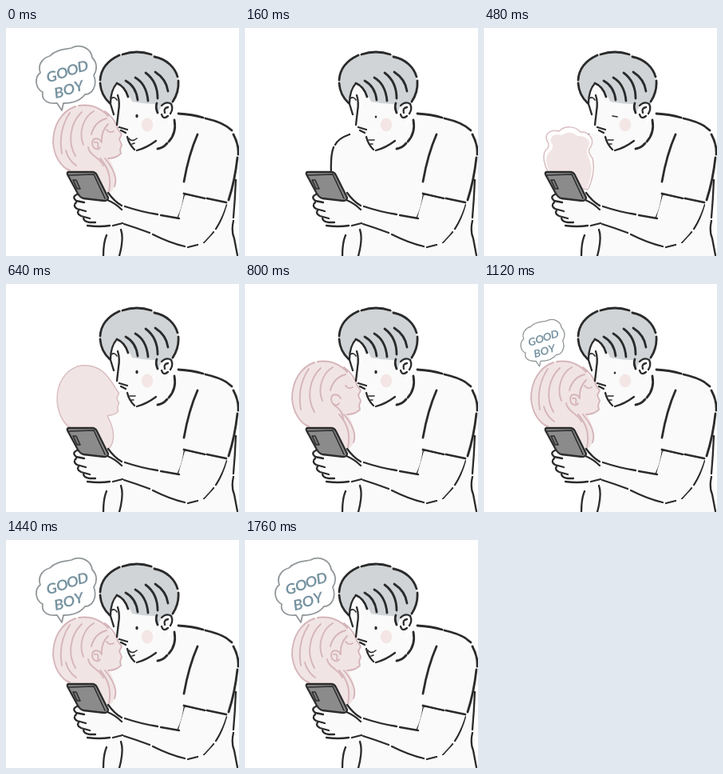
An HTML page for the animation above (1.92 s loop, 292 px wide and 285 px high).

```html
<!DOCTYPE html>
<html lang="en">
<head>
<meta charset="utf-8">
<title>Good boy</title>
<style>
  html, body { margin: 0; width: 100%; height: 100%; overflow: hidden; background: #fff; }
  svg { display: block; width: 100vw; height: 100vh; }
  path { stroke-linecap: round; stroke-linejoin: round; }
  .ink { fill: none; stroke: #2b2b2b; stroke-width: 2.3; }
  .bold { stroke-width: 2.8; }
  .fine { stroke-width: 1.6; }
  .pink { fill: none; stroke: #d5b5ba; stroke-width: 1.9; }
  .skin { fill: #fafafa; }
  .rose { fill: #f1e4e5; }
  .bubble { fill: #fff; stroke: #92979a; stroke-width: 1.8; }
  text { font: 700 18px Lato, "Open Sans", sans-serif; fill: #7893a1; text-anchor: middle; }
</style>
</head>
<body>
<svg viewBox="0 0 292 285">
  <defs>
    <path id="head" d="M80 180C70 176 60 162 59 143C58 122 69 104 87 98C103 94 119 99 129 111C134 117 138 122 140 126L145 133L142 140L145 146L143 152L144 157C141 161 135 162 129 163C134 172 139 184 137 194C136 200 133 205 128 208L105 200Z"/>
  </defs>

  <!-- body -->
  <path class="skin" d="M134 131C120 138 109 147 108 166L106 184L126 248L121 285H290L284 240L291 158C290 140 286 126 270 118C251 110 231 107 211 107L190 143Z"/>
  <path class="ink" d="M131 133Q117 138 113 146M111 149Q107 159 108 181M126 259Q122 268 122 285M144 252Q148 263 142 285"/>
  <path class="ink bold" d="M216 107Q234 108 247 112M250 113Q273 118 283 128M285 133Q292 146 291 158M290 162Q287 190 279 215"/>
  <path class="ink" d="M288 190Q287 215 285 237M285 241Q282 254 286 263L290 284"/>
  <path class="ink bold" d="M240 133Q229 158 223 192M223 207L249 213M252 213L276 218M224 209Q222 225 216 237"/>
  <path class="ink" d="M276 221Q271 239 263 251M260 255L248 268"/>
  <path class="skin" d="M131 92L134 110L141 126L150 134L155 147Q163 156 175 149Q196 140 202 121L208 104L201 85L165 65L139 65Z"/>
  <path class="ink bold" d="M211 115Q214 131 204 142M202 144Q197 150 190 151"/>

  <!-- growing shape -->
  <g data-on="2" transform="translate(110 200) scale(.62) translate(-110 -200)">
    <use href="#cloud"/>
  </g>
  <g data-on="3">
    <g id="cloud">
      <path d="M81 181C75 171 73 160 77 153Q84 148 79 141C75 132 84 126 94 129C101 122 114 122 121 130C131 129 139 139 134 148C129 154 132 157 136 163C139 176 136 191 130 202L107 197Z" fill="#fff" stroke="#d9bdc1" stroke-width="1.5"/>
      <path class="rose" d="M84 181C76 170 77 158 83 154Q89 149 84 143C82 135 89 131 97 134Q108 127 117 135C128 134 136 141 130 150C126 156 134 163 135 177Q134 190 128 201L107 196Z"/>
    </g>
  </g>
  <g data-on="4" transform="translate(110 200) scale(.9 .95) translate(-110 -200)">
    <use href="#head" class="rose" style="stroke:#d9bdc1;stroke-width:1.6"/>
  </g>

  <!-- woman -->
  <g data-on="0 5 6 7 8 9 10 11">
    <use href="#head" class="rose"/>
    <path class="pink" d="M80 178C69 174 60 160 59 143C59 121 70 104 87 98M91 97C106 95 118 99 128 110M124 104Q135 112 140 125M140 126L145 133L142 139L145 146L143 152L144 157Q138 163 128 163"/>
    <path class="pink" d="M80 106Q65 128 70 157M95 105C80 119 77 143 87 160M110 104C96 112 91 132 97 146M126 113Q111 117 107 133M124 163C134 175 140 188 136 198M118 163Q134 181 129 204"/>
    <path class="pink" d="M118 149C115 154 108 150 108 144C108 137 116 136 120 143"/>
    <path class="pink" d="M126 127Q130 132 135 129"/>
    <g data-on="0 6 7 8 9 10 11">
      <path class="pink" d="M111 143Q117 141 115 149M120 142Q119 129 128 120M103 149C104 159 118 162 122 172M75 153Q78 165 88 172"/>
    </g>
    <path data-on="5" class="pink" d="M111 151Q123 158 123 169"/>
  </g>

  <!-- face -->
  <path class="ink" d="M131 95L135 108M140 84Q143 93 141 104L139 121M142 124L152 127M144 128L150 131M152 136Q154 145 161 152M164 153Q176 150 188 141"/>
  <path class="ink fine" d="M132 88Q136 85 139 90"/>
  <ellipse cx="177" cy="121" rx="7.2" ry="8.5" fill="#f3e6e4"/>
  <g fill="#2b2b2b">
    <ellipse data-on="0 4 5 6 8 9 10 11" cx="164" cy="110" rx="1.7" ry="2.2"/>
    <ellipse data-on="1 2 7" cx="164" cy="111" rx="1.3" ry="1.5"/>
  </g>
  <path data-on="3" class="ink fine" d="M161 110L167 111"/>
  <path data-on="1 2 3 4 5 6 7 8" class="ink fine" d="M155 140L162 140M157 145L160 145"/>
  <path data-on="0 9 10 11" class="ink fine" d="M154 138Q158 143 164 138M158 145L161 144"/>

  <!-- hair -->
  <path d="M131 95C121 86 116 75 118 62C121 43 138 31 161 30C186 29 207 42 214 60C218 75 213 86 208 96Q200 91 195 97L190 107L187 95Q174 95 158 92Q152 76 139 67Q132 76 131 95Z" fill="#d0d4d7"/>
  <path class="ink bold" d="M130 94Q119 84 118 69M118 65C119 49 129 40 142 34M146 33Q164 27 182 33M186 36C202 39 212 50 215 61M216 66Q217 80 209 92"/>
  <path class="ink" d="M131 94Q131 78 139 69"/>
  <path class="ink bold" d="M139 69Q149 73 153 86M150 66Q163 73 165 90M162 62Q176 70 178 91M175 56Q190 67 190 88M187 55Q201 64 203 79M190 106Q187 99 189 94"/>
  <path class="skin" d="M195 97Q202 90 208 97Q211 105 200 113L195 107Z"/>
  <path class="ink" d="M195 97Q201 91 207 95Q210 101 206 107M203 110Q197 115 195 108M203 99Q197 100 199 106"/>

  <!-- forearm, hand and phone -->
  <path class="skin" d="M127 213C151 222 175 234 216 237L224 209L276 220C268 246 256 260 246 269Q238 276 224 274C200 268 176 253 148 244Q122 251 103 246L87 229L84 212Z"/>
  <path class="ink" d="M128 206Q136 217 145 222M149 223Q170 230 190 233M194 234L217 238M148 245Q164 250 180 256M184 258Q206 269 224 273M228 274L240 271"/>
  <path class="ink" d="M89 208Q82 211 88 216L98 218M88 218Q83 222 89 226L100 229M91 228Q88 232 94 235L105 238M97 237Q97 242 105 243L112 243M102 247Q117 249 130 247M134 247L146 244M127 215Q137 219 145 227"/>
  <path d="M79 180L108 180Q112 180 114 184L128 212Q128 216 123 216L97 213Q93 212 90 207L77 183Q76 180 79 180Z" fill="#8b8b8c" stroke="#2c2c2d" stroke-width="2.3"/>
  <path class="ink fine" d="M79 184L110 183L124 213"/>
  <path d="M84 190L88 190L93 201L89 201Z" fill="#77777a" stroke="#2c2c2d" stroke-width="1.5"/>

  <!-- speech bubble -->
  <g id="say" data-on="0 7 8 9 10 11">
    <path class="bubble" d="M64 94C52 95 44 90 46 80C37 76 35 62 43 56C39 45 47 37 55 35C63 26 76 27 82 25C94 19 107 26 108 37C115 44 114 53 110 59C115 72 108 83 99 83C93 91 82 94 72 94L70 103Z"/>
    <g id="words"></g>
  </g>
</svg>
<script>
  const STEP = 160, COUNT = 12;
  const say = document.getElementById('say');
  const words = document.getElementById('words');
  const parts = [...document.querySelectorAll('[data-on]')].map(el => ({
    el, on: new Set(el.dataset.on.split(' ').map(Number))
  }));

  // Letters climb to the right, each turned a little.
  function write(word, x, y, dx, dy) {
    [...word].forEach((ch, i) => {
      const t = document.createElementNS('http://www.w3.org/2000/svg', 'text');
      t.textContent = ch;
      t.setAttribute('transform', `translate(${x + i * dx} ${y + i * dy}) rotate(-12) skewX(-6)`);
      words.append(t);
    });
  }
  write('GOOD', 58, 67, 13, -4.2);
  write('BOY', 67, 87, 12.5, -4);

  const growth = { 7: .73, 8: .88 };
  const sway = { 10: .8, 11: -.8 };

  function show(step) {
    for (const { el, on } of parts) el.style.display = on.has(step) ? '' : 'none';
    say.setAttribute('transform', `translate(68 103) scale(${growth[step] || 1}) translate(-68 -103)`);
    words.setAttribute('transform', `rotate(${sway[step] || 0} 77 64)`);
  }

  const start = performance.now();
  let last = 0;
  function tick() {
    const step = Math.floor((performance.now() - start) / STEP) % COUNT;
    if (step !== last) show(last = step);
    requestAnimationFrame(tick);
  }
  show(0);
  requestAnimationFrame(tick);
</script>
</body>
</html>
```
